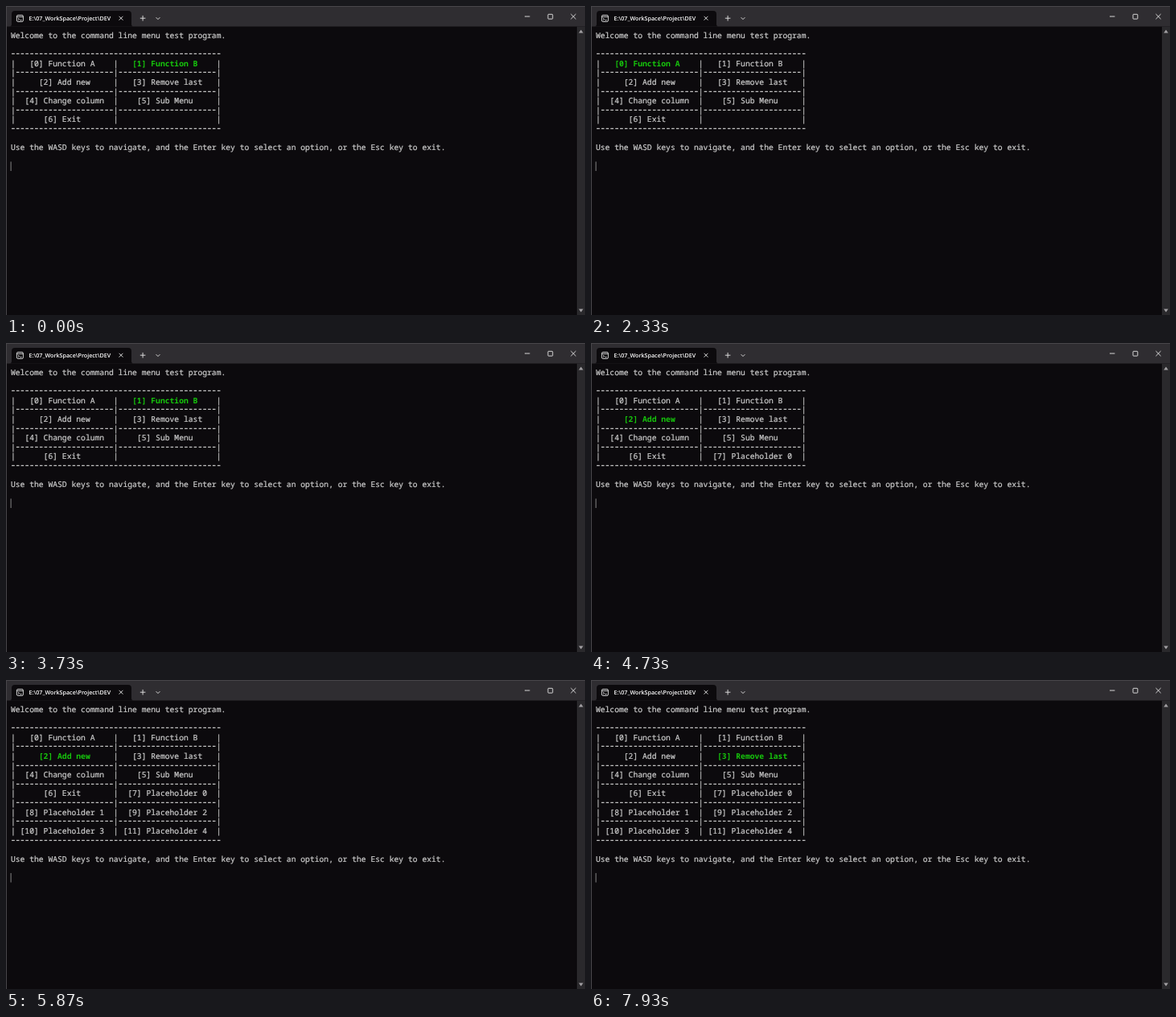
Recreate the animation shown at these times as an HTML page. Size 720x384 px, loop 8000 ms.

```html
<!DOCTYPE html>
<html lang="en">
<head>
<meta charset="utf-8">
<title>Console menu</title>
<style>
html, body { margin: 0; width: 100%; height: 100%; overflow: hidden; background: #0c0a0d; }
svg { display: block; width: 720px; height: 384px; }
text { white-space: pre; text-rendering: geometricPrecision; }
#screen { font: 9.692px "Noto Sans Mono", "DejaVu Sans Mono", monospace; fill: #cccccc; stroke: #cccccc; stroke-width: .22; }
#screen .on { fill: #16c60c; stroke: none; font-weight: 600; }
#screen .rule { stroke-width: .6; baseline-shift: 1px; }
#title { font: 600 7.15px "Open Sans", "Noto Sans", sans-serif; fill: #fff; }
.line { fill: none; stroke: #e8e8e8; stroke-width: .9; }
</style>
</head>
<body>
<svg viewBox="0 0 720 384">
  <defs><clipPath id="tabClip"><rect x="28" y="8" width="103.2" height="16"/></clipPath></defs>
  <rect width="720" height="384" fill="#0c0a0d"/>
  <rect width="720" height="25.5" fill="#2f2d31"/>
  <rect x="710" y="25.5" width="10" height="358.5" fill="#2a292c"/>
  <path d="M0 .5H720M.5 0V384" fill="none" stroke="#48464a"/>
  <path d="M4 25.6Q7 25.6 7 22.5V10Q7 6 11 6H152Q156 6 156 10V22.5Q156 25.6 159 25.6Z" fill="#0c0a0d"/>
  <rect class="line" x="13.4" y="11.4" width="8" height="8" rx="1.5"/>
  <path class="line" d="M13.4 13.4H21.4M15 15.2L16.5 16.4L15 17.6M17.4 17.6H19.6"/>
  <g clip-path="url(#tabClip)"><text id="title" x="28.5" y="17.9">E:\07_WorkSpace\Project\DEV</text></g>
  <path class="line" d="M140.6 12.8L145.4 17.6M145.4 12.8L140.6 17.6"/>
  <path class="line" d="M166.8 15.2H173.4M170.1 11.9V18.5"/>
  <path class="line" d="M186.6 14.2L189 16.6L191.4 14.2"/>
  <path class="line" d="M645 13H651.4M702.4 10L708.6 16.2M708.6 10L702.4 16.2"/>
  <rect class="line" x="674" y="10.3" width="5.8" height="5.8" rx=".7"/>
  <path d="M712.2 33.6L715 29.6L717.8 33.6ZM712.2 376.4L715 380.4L717.8 376.4Z" fill="#a2a0a3"/>
  <g id="screen"></g>
  <rect id="cursor" x="5.6" width="1" height="11.6" fill="#858585"/>
</svg>
<script>
const LOOP = 8000, LEFT = 5.9, TOP = 30.6, ROW = 11.63, CELL = 21;
const LABELS = ["Function A", "Function B", "Add new", "Remove last", "Change column", "Sub Menu", "Exit"];
const screenEl = document.getElementById("screen");
const cursorEl = document.getElementById("cursor");

// [start ms, selected option, option count], or [start ms, called function]
const STEPS = [
  [0, 1, 7], [470, 0, 7], [1070, "A"],
  [2330, 0, 7], [2800, 1, 7], [3130, "B"],
  [3670, 1, 7], [4070, 2, 7],
  [4670, 2, 8], [5070, 2, 9], [5400, 2, 10], [5630, 2, 11], [5830, 2, 12], [6070, 2, 13],
  [6470, 4, 13], [6930, 5, 13], [7530, 3, 13], [7870, 3, 12]
];
const CURSOR_OFF = [1800, 2330];

const span = (name, text) => `<tspan class="${name}">${text}</tspan>`;
const rule = length => span("rule", "-".repeat(length));

function cell(i, selected, count) {
  if (i >= count) return " ".repeat(CELL);
  const label = `[${i}] ${LABELS[i] || "Placeholder " + (i - LABELS.length)}`;
  const pad = Math.floor((CELL - label.length) / 2);
  const shown = i === selected ? span("on", label) : label;
  return " ".repeat(pad) + shown + " ".repeat(CELL - label.length - pad);
}

function menu(selected, count) {
  const dash = rule(CELL), edge = rule(2 * CELL + 3);
  const rows = ["Welcome to the command line menu test program.", "", edge];
  for (let i = 0; i < count; i += 2) {
    if (i) rows.push(`|${dash}|${dash}|`);
    rows.push(`|${cell(i, selected, count)}|${cell(i + 1, selected, count)}|`);
  }
  rows.push(edge, "",
    "Use the WASD keys to navigate, and the Enter key to select an option, or the Esc key to exit.", "");
  return rows;
}

function page(name) {
  return [`Function ${name} called.`, "", "Press ESC key to back to the main menu."];
}

let current = null;
function draw(t) {
  const step = STEPS.findLast(s => s[0] <= t);
  if (step !== current) {
    current = step;
    const rows = step.length === 2 ? page(step[1]) : menu(step[1], step[2]);
    screenEl.innerHTML = rows.map((row, i) =>
      row && `<text x="${LEFT}" y="${(TOP + 9.2 + i * ROW).toFixed(2)}">${row}</text>`).join("");
    cursorEl.setAttribute("y", (TOP + rows.length * ROW).toFixed(2));
  }
  const off = t >= CURSOR_OFF[0] && t < CURSOR_OFF[1];
  cursorEl.setAttribute("visibility", off ? "hidden" : "visible");
}

const start = performance.now();
function tick() {
  draw((performance.now() - start) % LOOP);
  requestAnimationFrame(tick);
}
tick();
</script>
</body>
</html>
```
